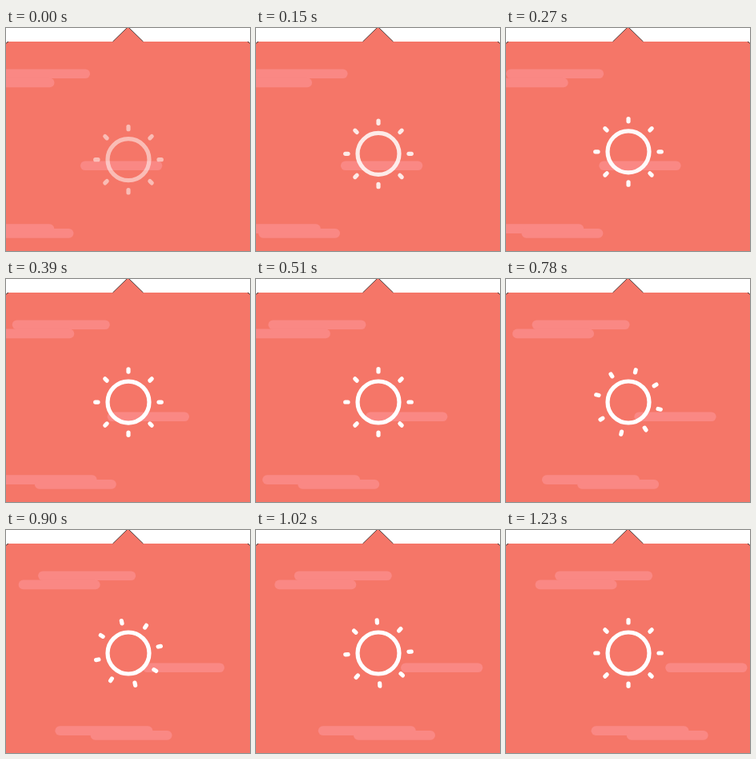
An HTML page that plays this animation: 305 px wide and 279 px high, repeating every 1260 ms.

```html
<!DOCTYPE html>
<html lang="en">
<head>
<meta charset="utf-8">
<title>Sunrise</title>
<style>
  html, body { margin: 0; width: 100%; height: 100%; overflow: hidden; background: #fff; }
  svg { display: block; width: 100%; height: 100%; }
  .card { fill: #f57668; }
  .edge { fill: none; stroke: #222; stroke-width: .8; }
  .cloud { fill: #fa8884; }
  .sun { fill: none; stroke: #fff; stroke-linecap: round; }
</style>
</head>
<body>
<svg viewBox="0 0 305 279">
  <path class="card" d="M0 279V20.500Q0 17 3.500 17H133.500L152.500 -1.500L171.500 17H301.500Q305 17 305 20.500V279Z"/>
  <path class="edge" d="M133.500 17L152.500 -1.500L171.500 17M.300 19.500Q.800 17.500 3 17.200M302 17.200Q304.200 17.500 304.700 19.500"/>
  <g id="clouds"></g>
  <g class="sun" id="sun">
    <circle r="26" stroke-width="5.200"/>
    <g id="rays" stroke-width="5.200"></g>
  </g>
</svg>
<script>
const LOOP = 1260, STEP = 30;
const $ = id => document.getElementById(id);

function add(parent, name, attrs) {
  const el = document.createElementNS('http://www.w3.org/2000/svg', name);
  for (const key in attrs) el.setAttribute(key, attrs[key]);
  return parent.appendChild(el);
}

// CSS-style cubic bezier, solved by bisection
function bezier(x1, y1, x2, y2) {
  const at = (a, b, s) => 3 * a * s * (1 - s) ** 2 + 3 * b * s * s * (1 - s) + s ** 3;
  return p => {
    if (p <= 0) return 0;
    if (p >= 1) return 1;
    let lo = 0, hi = 1;
    for (let i = 0; i < 24; i++) {
      const mid = (lo + hi) / 2;
      if (at(x1, x2, mid) < p) lo = mid; else hi = mid;
    }
    return at(y1, y2, lo);
  };
}

const rise = bezier(.25, .1, .25, 1);
const spin = bezier(.25, .1, .35, 1);

// x at start, y, width, distance per loop
const clouds = [
  [-17, 51.4, 122, 80],
  [-41.500, 62.6, 102, 80],
  [93, 166.400, 102.300, 108.800],
  [-61.700, 245.300, 122, 172.300],
  [-17.500, 251, 102, 172.300]
].map(([x, y, width, travel]) => ({
  x, travel,
  el: add($('clouds'), 'rect', { class: 'cloud', y, width, height: 11.700, rx: 5.850 })
}));

for (let a = 0; a < 360; a += 45)
  add($('rays'), 'path', { d: 'M0 -38V-41.300', transform: `rotate(${a})` });

function draw(t) {
  for (const c of clouds) c.el.setAttribute('x', c.x + c.travel * t / LOOP);
  const up = rise((t + 180) / 600);
  const turn = 90 * spin((t - 529) / 604);
  $('sun').setAttribute('transform', `translate(153 ${154 + 22 * (1 - up)})`);
  $('sun').setAttribute('opacity', up);
  $('rays').setAttribute('transform', `rotate(${turn})`);
}

const start = performance.now();
function tick() {
  const t = (performance.now() - start) % LOOP;
  draw(Math.floor(t / STEP) * STEP);
  requestAnimationFrame(tick);
}
tick();
</script>
</body>
</html>
```
